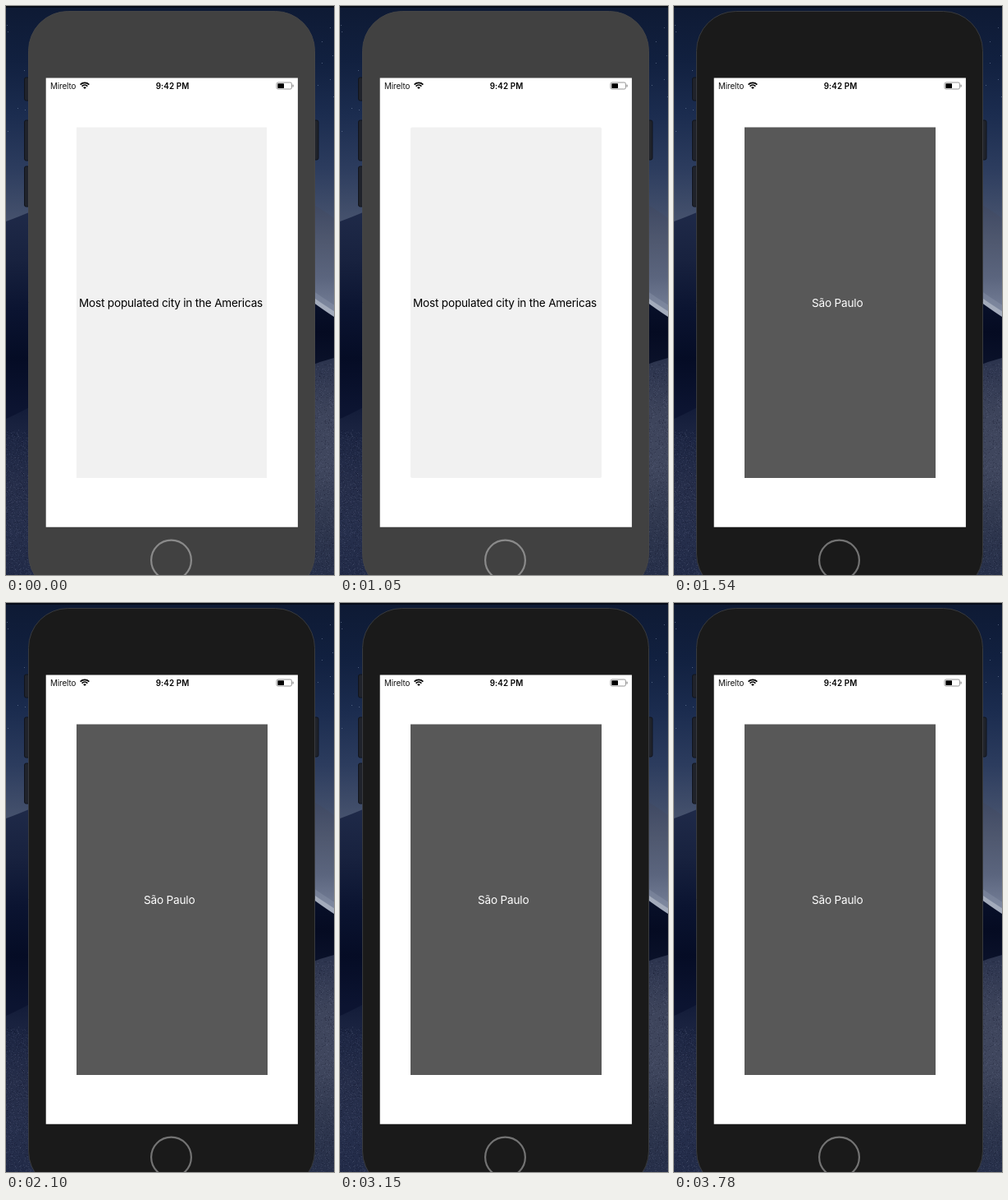
Write an HTML page with a canvas that moves like this. It is 400 by 692 pixels and loops after 3.85 s.

```html
<!DOCTYPE html>
<html lang="en">
<head>
<meta charset="utf-8">
<title>Flip card</title>
<style>
  html, body { margin: 0; width: 100%; height: 100%; overflow: hidden; background: #0b1730; }
  canvas { display: block; width: 400px; height: 692px; }
</style>
</head>
<body>
<canvas id="stage" width="400" height="692"></canvas>
<script>
const W = 400, H = 692, LOOP = 3850;
const SETTLED = 70, DARKEN = 1400, REVEAL = 1540;
const FONT = 'Inter, "Liberation Sans", sans-serif';
const ctx = document.getElementById('stage').getContext('2d');

function randomizer(seed) {
  return () => {
    seed = (seed * 1664525 + 1013904223) >>> 0;
    return seed / 4294967296;
  };
}

function gradient(c, y0, y1, colors) {
  const g = c.createLinearGradient(0, y0, 0, y1);
  colors.forEach((color, i) => g.addColorStop(i / (colors.length - 1), color));
  return g;
}

function roundRect(c, x, y, w, h, r, fill, stroke, width = 1) {
  c.beginPath();
  c.roundRect(x, y, w, h, r);
  if (fill) { c.fillStyle = fill; c.fill(); }
  if (stroke) { c.strokeStyle = stroke; c.lineWidth = width; c.stroke(); }
}

// A dune: starts at its ridge and fills to the bottom of the stage.
function dune(c, x0, y0, cx, cy, x1, y1, fill) {
  c.beginPath();
  c.moveTo(x0, y0);
  c.quadraticCurveTo(cx, cy, x1, y1);
  c.lineTo(x1, H);
  c.lineTo(x0, H);
  c.closePath();
  c.fillStyle = fill;
  c.fill();
}

function paintDesert(c) {
  const rnd = randomizer(7);
  c.fillStyle = gradient(c, 0, 262, ['#0e1a34', '#11203f', '#1b2c4f', '#2c3c5e', '#46526d']);
  c.fillRect(0, 0, W, H);
  c.fillStyle = 'rgba(190,205,235,0.35)';
  for (let i = 0; i < 14; i++) {
    const x = rnd() < 0.5 ? rnd() * 26 : 378 + rnd() * 22;
    c.fillRect(Math.floor(x), Math.floor(10 + rnd() * 190), 1, 1);
  }

  // left: shaded slope, then a soft rise
  dune(c, 0, 262, 14, 257, 40, 246, gradient(c, 248, 490, ['#1f2a49', '#18223f', '#0b1431', '#050c25', '#0c1431']));
  dune(c, 0, 502, 14, 496, 40, 482, gradient(c, 482, 692, ['#111a37', '#1f2845', '#262e4a', '#262f4c', '#222b48']));

  // right: lit slope with a bright edge over a shadow
  dune(c, 370, 239, 384, 246, 400, 258, gradient(c, 242, 375, ['#3f4963', '#4f586f', '#5b657e', '#78829a']));
  for (const [width, color] of [[22, 'rgba(150,160,180,0.3)'], [9, '#a3abbb']]) {
    c.strokeStyle = color;
    c.lineWidth = width;
    c.beginPath();
    c.moveTo(366, 354);
    c.quadraticCurveTo(386, 368, 404, 379);
    c.stroke();
  }
  dune(c, 370, 357, 386, 369, 400, 378, gradient(c, 362, 432, ['#081029', '#050b22', '#0a1129']));
  dune(c, 370, 438, 384, 432, 400, 428, gradient(c, 428, 692, ['#2b334d', '#3d445b', '#40475e', '#30384f', '#262f49']));

  // fine sand
  for (let i = 0; i < 3200; i++) {
    const left = rnd() < 0.5;
    const x = left ? rnd() * 36 : 370 + rnd() * 30;
    const y = (left ? 515 : 435) + rnd() * (left ? 177 : 257);
    c.fillStyle = rnd() < 0.5 ? 'rgba(140,150,175,0.13)' : 'rgba(0,4,20,0.16)';
    c.fillRect(Math.floor(x), Math.floor(y), 1, 1);
  }
  c.fillStyle = '#060b18';
  c.fillRect(0, 0, W, 2);
}

const desert = document.createElement('canvas');
desert.width = W;
desert.height = H;
paintDesert(desert.getContext('2d'));

function drawPhone(dark) {
  for (const [x, y, h] of [[22.5, 87, 28], [22.5, 139, 49], [22.5, 195, 49], [374, 139, 48]]) {
    roundRect(ctx, x, y, 7, h, 2, '#20232b', '#11141c');
  }
  roundRect(ctx, 27.5, 6.5, 349, 708, 48, dark ? '#1a1a1a' : '#414141', dark ? '#383a3e' : '#454546');
  roundRect(ctx, 48.7, 87.5, 307.2, 546.2, 0, '#fff');
  ctx.beginPath();
  ctx.arc(201.5, 674, 24.4, 0, Math.PI * 2);
  ctx.strokeStyle = dark ? '#737373' : '#8a8a8a';
  ctx.lineWidth = 2.2;
  ctx.stroke();
}

function text(str, x, y, size, align, color, weight = 400, spacing = 0) {
  ctx.font = `${weight} ${size}px ${FONT}`;
  ctx.letterSpacing = spacing + 'px';
  ctx.textAlign = align;
  ctx.fillStyle = color;
  ctx.fillText(str, x, y);
}

function drawWifi(x, y) {
  ctx.strokeStyle = ctx.fillStyle = '#000';
  ctx.lineWidth = 1.7;
  const from = -Math.PI * 0.75, to = -Math.PI * 0.25;
  for (const r of [4.8, 7.6]) {
    ctx.beginPath();
    ctx.arc(x, y, r, from, to);
    ctx.stroke();
  }
  ctx.beginPath();
  ctx.moveTo(x, y);
  ctx.arc(x, y, 2.7, from, to);
  ctx.fill();
}

function drawStatus() {
  text('Mirelto', 54, 100.5, 9.8, 'left', '#111', 400, -0.1);
  drawWifi(96, 101);
  text('9:42 PM', 203, 100.5, 9.8, 'center', '#000', 600, 0.1);
  roundRect(ctx, 330, 93, 18.5, 8, 1.8, null, '#8c8c8c', 0.9);
  roundRect(ctx, 331.3, 94.2, 7.7, 5.7, 0.6, '#000');
  roundRect(ctx, 349.5, 95.5, 1.2, 3, 0.6, '#8c8c8c');
}

function drawCard(t) {
  const back = t >= REVEAL, moving = t < SETTLED;
  const width = moving ? 232 : 233;
  const radius = back || moving ? 0 : 2;
  roundRect(ctx, 86, 147.5, width, 426.5, radius, back ? '#585858' : '#f1f1f1');
  if (back) text('São Paulo', 199.2, 365.5, 13.6, 'center', '#fff', 400, -0.2);
  else text('Most populated city in the Americas', 201, 365.5, 13.6, 'center', '#000', 400, -0.2);
}

function draw(t) {
  ctx.drawImage(desert, 0, 0);
  drawPhone(t >= DARKEN);
  drawStatus();
  drawCard(t);
}

const start = performance.now();
function tick() {
  draw((performance.now() - start) % LOOP);
  requestAnimationFrame(tick);
}
draw(0);
requestAnimationFrame(tick);
</script>
</body>
</html>
```
